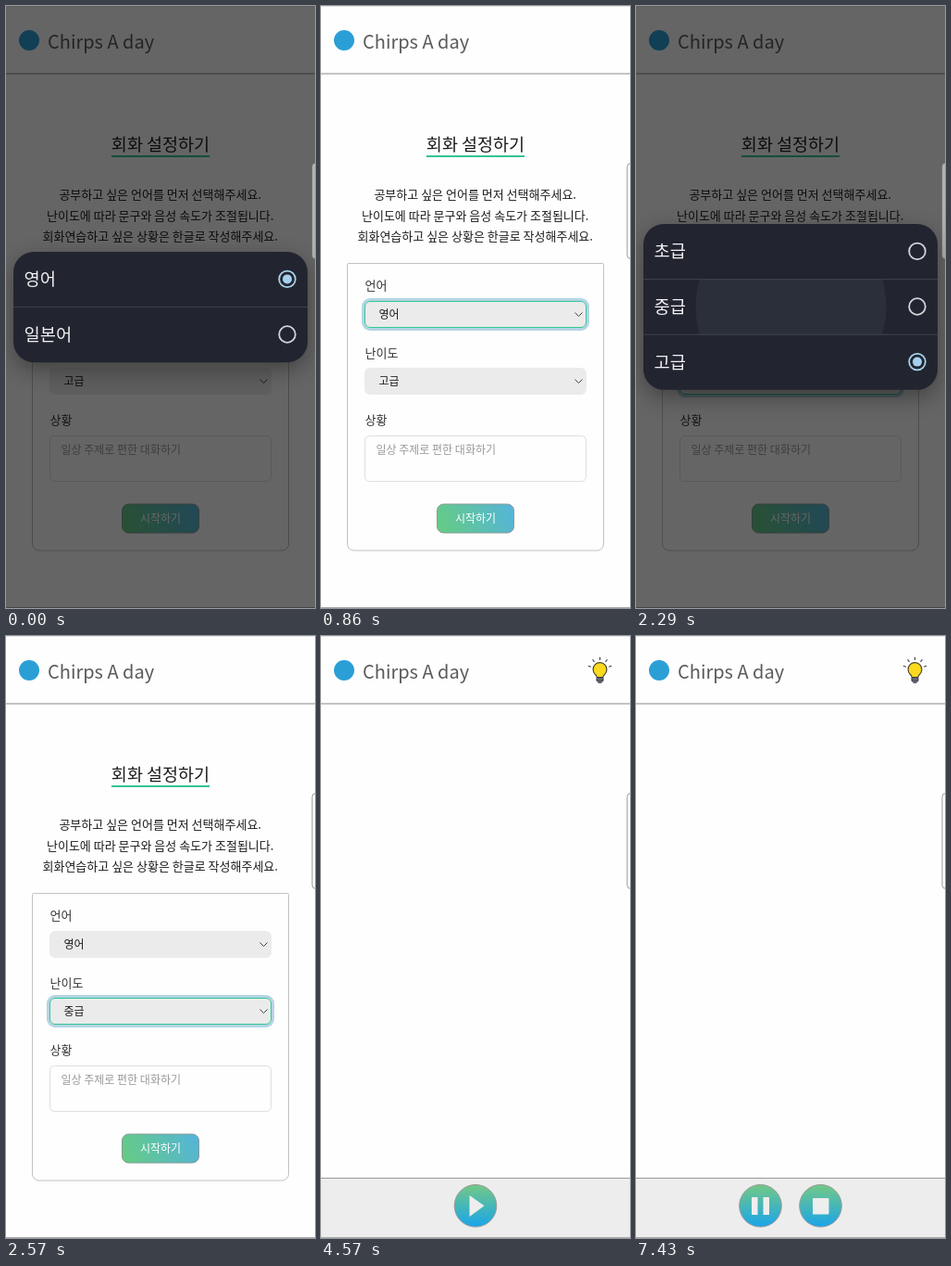
Write an HTML page with a canvas that moves like this. It is 334 by 649 pixels and loops after 8 s.

```html
<!DOCTYPE html>
<html lang="ko">
<head>
<meta charset="utf-8">
<title>회화 설정하기</title>
<style>
html, body { margin: 0; width: 100%; height: 100%; overflow: hidden; background: #fefefe; }
canvas { display: block; width: 334px; height: 649px; }
</style>
</head>
<body>
<canvas id="stage"></canvas>
<script>
const W = 334, H = 649, LOOP = 8000;
const FONT = '"Noto Sans CJK KR", "Noto Sans CJK JP", sans-serif';
const canvas = document.getElementById('stage');
const ctx = canvas.getContext('2d');
const ratio = window.devicePixelRatio || 1;
canvas.width = W * ratio;
canvas.height = H * ratio;

// Backdrop opacity, each value holding until the next start time
const DIM = [[0, .6], [710, .137], [860, 0], [1140, .455], [1290, .6], [2430, .137], [2570, 0]];
const LANGS = ['영어', '일본어'];
const LEVELS = ['초급', '중급', '고급'];

const within = (t, a, b) => t >= a && t < b;

function holdAt(steps, t) {
  let value = steps[0][1];
  for (const [start, v] of steps) if (t >= start) value = v;
  return value;
}

function rect(x, y, w, h, r, fill, stroke, line = 1) {
  ctx.beginPath();
  ctx.roundRect(x, y, w, h, r);
  paint(fill, stroke, line);
}

function circle(x, y, r, fill, stroke, line = 1) {
  ctx.beginPath();
  ctx.arc(x, y, r, 0, Math.PI * 2);
  paint(fill, stroke, line);
}

function paint(fill, stroke, line) {
  if (fill) { ctx.fillStyle = fill; ctx.fill(); }
  if (stroke) { ctx.strokeStyle = stroke; ctx.lineWidth = line; ctx.stroke(); }
}

function path(points, stroke, line) {
  ctx.beginPath();
  points.forEach(([x, y]) => ctx.lineTo(x, y));
  paint(null, stroke, line);
}

function bar(x, y, w, h, color) {
  ctx.fillStyle = color;
  ctx.fillRect(x, y, w, h);
}

function gradient(x0, y0, x1, y1, from, to) {
  const g = ctx.createLinearGradient(x0, y0, x1, y1);
  g.addColorStop(0, from);
  g.addColorStop(1, to);
  return g;
}

// Hangul is placed by the middle of its line
function text(str, x, mid, size, color, align = 'left', weight = 400) {
  ctx.font = `${weight} ${size}px ${FONT}`;
  ctx.textAlign = align;
  ctx.fillStyle = color;
  ctx.fillText(str, x, mid + size * .37);
}

function header() {
  bar(0, 0, W, 1, '#e6e6e6');
  bar(0, 72.5, W, 1, '#8c8c8c');
  bar(0, 648, W, 1, '#aaa');
  circle(25, 37, 11, '#2a9fd6');
  text('Chirps A day', 45, 38.2, 20, '#5a5a5a', 'left', 300);
}

function select(y, value, focused) {
  if (focused) rect(44, y - 3, 246, 35, 9, '#b3d5e4');
  rect(47, y, 240, 29, 6, '#ebebeb');
  if (focused) rect(47.5, y + .5, 239, 28, 5.5, null, '#35c797');
  text(value, 62.5, y + 14.5, 12, '#1c1c1c');
  path([[274.5, y + 12.5], [278.5, y + 16.5], [282.5, y + 12.5]], '#444', 1);
}

function form(t) {
  text('회화 설정하기', 167, 149, 18.5, '#1c1c1c', 'center');
  bar(114, 161, 106, 2, '#35c391');
  [['공부하고 싶은 언어를 먼저 선택해주세요.', 203.5],
   ['난이도에 따라 문구와 음성 속도가 조절됩니다.', 226],
   ['회화연습하고 싶은 상황은 한글로 작성해주세요.', 248]]
    .forEach(([line, y]) => text(line, 166.7, y, 13, '#1c1c1c', 'center'));

  rect(28.5, 277.5, 277, 309.5, [1, 1, 7, 7], null, '#c2c2c2');
  text('언어', 47.5, 301.5, 13, '#333');
  select(318, '영어', t < 1000);
  text('난이도', 47.5, 374, 13, '#333');
  select(390, t < 2430 ? '고급' : '중급', within(t, 1000, 3710));
  text('상황', 47.5, 446.5, 13, '#333');
  rect(47.5, 463.5, 239, 49, 5, null, '#dedede');
  text('일상 주제로 편한 대화하기', 59.5, 478.5, 12, '#9a9a9a');
  rect(125.5, 537, 83, 31, 7, gradient(125, 568, 209, 537, '#66cc80', '#54b4dc'), '#8a9a98');
  text('시작하기', 167, 552.5, 12, '#fff', 'center');
}

function dialog(top, options, chosen, pressed) {
  const row = 59.6, h = row * options.length;
  ctx.save();
  ctx.shadowColor = 'rgba(0,0,0,.35)';
  ctx.shadowBlur = 24 * ratio;
  ctx.shadowOffsetY = 8 * ratio;
  rect(8, top, 318, h, 22, '#22252f');
  ctx.restore();

  if (pressed >= 0) {
    ctx.save();
    ctx.beginPath();
    ctx.rect(8, top + row * pressed, 318, row);
    ctx.clip();
    circle(167.5, top + row * (pressed + .5), 103, '#2b2f3a');
    ctx.restore();
  }

  options.forEach((name, i) => {
    const mid = top + row * (i + .5) - .4;
    if (i) bar(8, top + row * i - .5, 318, 1, '#3e424d');
    text(name, 19.5, mid, 18.7, '#f2f2f4', 'left', 500);
    const on = i === chosen;
    circle(304, mid, 8.8, null, on ? '#a9d2ea' : '#d4d5d9', 1.8);
    if (on) circle(304, mid, 5, '#a4d0ee');
  });
}

function edgeHandle(dim) {
  rect(331, 169.5, 12, 103, 4, `rgba(255,255,255,${dim ? .5 : 1})`, `rgba(150,150,150,${1 - dim})`);
}

function bulb() {
  for (let i = -2; i <= 2; i++) {
    const a = Math.PI * (1.5 + i * .205);
    const c = Math.cos(a), s = Math.sin(a);
    path([[301.5 + c * 10, 36 + s * 10], [301.5 + c * 13.2, 36 + s * 13.2]], '#3a3f48', 1.1);
  }
  ctx.beginPath();
  ctx.moveTo(298.2, 44.5);
  ctx.quadraticCurveTo(298, 42.5, 296.2, 41.3);
  ctx.arc(301.5, 36, 7.4, Math.PI * .755, Math.PI * 2.245);
  ctx.quadraticCurveTo(305, 42.5, 304.8, 44.5);
  ctx.closePath();
  paint('#fbd91f', '#4a4630', 1.2);
  rect(298, 44.5, 7, 4.5, 1, '#62666e', '#333842');
  bar(299.5, 49.5, 4, 1.3, '#333842');
}

function roundButton(x) {
  circle(x, 614.3, 22.8, gradient(0, 592, 0, 637, '#72c886', '#1aa5ea'), '#9a9a9a');
}

function player(t) {
  bulb();
  bar(0, 584, W, 64, '#ededed');
  bar(0, 584, W, 1, '#999');
  const icon = '#eee';
  if (t < 6140) {
    roundButton(167);
    ctx.beginPath();
    ctx.moveTo(160.5, 603);
    ctx.lineTo(176.5, 614.3);
    ctx.lineTo(160.5, 626);
    ctx.closePath();
    paint(icon);
  } else {
    roundButton(134.5);
    bar(125, 605, 6.5, 19, icon);
    bar(137.5, 605, 6.5, 19, icon);
    roundButton(199.5);
    rect(191, 606, 17.5, 17.5, 1, icon);
  }
}

function draw(t) {
  const dim = holdAt(DIM, t);
  ctx.setTransform(ratio, 0, 0, ratio, 0, 0);
  bar(0, 0, W, H, '#fefefe');
  header();
  if (t < 4570) form(t);
  else player(t);
  if (dim) bar(0, 0, W, H, `rgba(0,0,0,${dim})`);
  edgeHandle(dim);
  if (t < 710) dialog(265, LANGS, 0, t >= 570 ? 0 : -1);
  if (within(t, 1140, 2430)) dialog(235, LEVELS, 2, t >= 2290 ? 1 : -1);
}

const start = performance.now();
function tick() {
  draw((performance.now() - start) % LOOP);
  requestAnimationFrame(tick);
}
tick();
</script>
</body>
</html>
```
